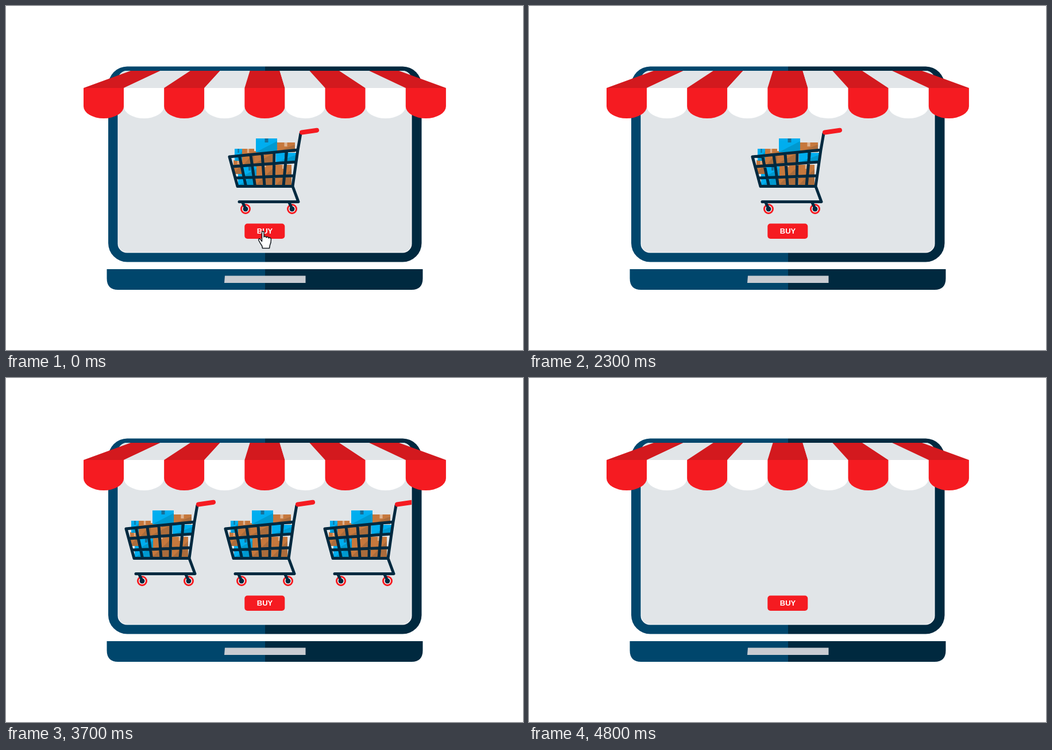
These frames come from a looping animation (900x600 px, 7.8 s). An HTML page:

```html
<!DOCTYPE html>
<html lang="en">
<head>
<meta charset="utf-8">
<title>Online shop</title>
<style>
  html, body { margin: 0; width: 100%; height: 100%; overflow: hidden; background: #fff; }
  svg { display: block; width: 100%; height: 100%; }
  text { font: bold 13px "Liberation Sans", Arial, sans-serif; fill: #fff; text-anchor: middle; }
  .frame { fill: none; stroke: #00293f; stroke-width: 5; stroke-linecap: round; stroke-linejoin: round; }
</style>
</head>
<body>
<svg viewBox="0 0 900 600">
  <defs>
    <linearGradient id="split" gradientUnits="userSpaceOnUse" x1="0" x2="900" y1="0" y2="0">
      <stop offset="0.5006" stop-color="#00466c"/>
      <stop offset="0.5006" stop-color="#00293f"/>
    </linearGradient>
    <clipPath id="screen"><rect x="194.5" y="196" width="511.5" height="234"/></clipPath>
  </defs>

  <g id="laptop">
    <rect x="178" y="105.5" width="545.5" height="341" rx="33" fill="url(#split)"/>
    <rect x="194.5" y="113" width="512" height="317.5" rx="16" fill="#fff"/>
    <rect x="195.5" y="113" width="510" height="316.5" rx="15" fill="#e1e5e8"/>
    <path d="M175.500 459H725.500V475Q725.500 495 706 495H195Q175.500 495 175.500 475Z" fill="url(#split)"/>
    <path d="M381 470.500H521.500V483H380Z" fill="#c8ccd2"/>
  </g>

  <g id="awning"></g>

  <g clip-path="url(#screen)">
    <g id="carts">
      <g id="cart">
        <g id="boxes"></g>
        <path class="frame" d="M513 222L508 251L499 314.500H403L389 263L508 251M394 280L504 272M399 300L501 296
          M406.500 262L417.500 314M426 260L433.500 314M446 258L450 314M467 256L466 314M488.500 254L483 314
          M499 314.500L509 341.500H406"/>
        <path d="M515 220.500L541 216.700" stroke="#f51b21" stroke-width="8" stroke-linecap="round"/>
        <g id="wheels"></g>
      </g>
      <g id="followers" display="none">
        <use href="#cart" x="173"/>
        <use href="#cart" x="346"/>
      </g>
    </g>
  </g>

  <rect x="415.300" y="379.500" width="70" height="26.500" rx="5" fill="#f51b21"/>
  <text x="450.500" y="396.600">BUY</text>

  <path id="hand" fill="#fff" stroke="#151b20" stroke-width="1.500" stroke-linejoin="round"
    d="M445.500 411V395Q445.500 393 447.200 393T449 395V403Q449.500 401.500 451.200 401.800T453 404
       Q453.500 402.500 455.300 402.800T457.200 405Q458 403.600 459.700 404.200T461.500 407
       Q461.500 413 459.500 417L458.500 422.500H446.500L445.700 418.500Q442 413 439.800 408.500
       Q439.300 406 441.500 405.800Q443.500 407 445.500 411"/>
</svg>

<script>
const LOOP = 7800;
const byId = id => document.getElementById(id);

function add(parent, tag, attributes) {
  const node = document.createElementNS("http://www.w3.org/2000/svg", tag);
  for (const [key, value] of Object.entries(attributes)) node.setAttribute(key, value);
  return parent.appendChild(node);
}

function buildAwning() {
  for (let i = 0; i < 9; i++) {
    const red = i % 2 === 0;
    const top = 217 + 51.9 * i, left = 135 + 70.1 * i, right = left + 70.1;
    add(byId("awning"), "path", {
      d: `M${top} 113H${top + 51.9}L${right} 143H${left}Z`, fill: red ? "#d3191e" : "#e1e5e8"
    });
    add(byId("awning"), "path", {
      d: `M${left} 143H${right}V175A35.05 21 0 0 1 ${left} 175Z`, fill: red ? "#f51b21" : "#fff"
    });
  }
}

const BLUE = { face: "#00aeef", shade: "#0099cf", tape: "#176f98" };
const BROWN = { face: "#c6783d", shade: "#aa6c3c", tape: "#deb28f" };

// Each box: appearance time, left, top, right, bottom, colours.
const boxes = [
  [700, 404, 292, 433, 313, BLUE],
  [700, 434, 274, 466, 313, BROWN],
  [700, 469, 277, 497, 313, BROWN],
  [900, 412, 280, 436, 297, BLUE],
  [1100, 396, 269, 412, 293, BROWN],
  [1300, 470, 256, 505, 273, BLUE],
  [1500, 432, 253, 465, 275, BROWN],
  [1700, 411, 249, 432, 280, BROWN],
  [1900, 398, 249, 411, 270, BLUE],
  [2100, 471, 238, 503, 255, BROWN],
  [2300, 435, 231, 472, 255, BLUE]
].map(([start, left, top, right, bottom, color]) => {
  const node = add(byId("boxes"), "g", {});
  const width = right - left, height = bottom - top;
  const tape = width * 0.16, middle = left + width / 2;
  add(node, "rect", { x: left, y: top, width, height, fill: color.face });
  add(node, "path", { d: `M${right} ${top + height * 0.2}V${bottom}H${left}Z`, fill: color.shade });
  add(node, "rect", { x: middle - tape / 2, y: top, width: tape, height: 7, fill: color.tape });
  return { node, start };
});

function buildWheels() {
  for (const x of [417, 498]) {
    add(byId("wheels"), "circle", { cx: x, cy: 354, r: 7.5, fill: "#fff", stroke: "#f51b21", "stroke-width": 3 });
    add(byId("wheels"), "circle", { cx: x, cy: 354, r: 4.5, fill: "#00293f" });
    add(byId("wheels"), "path", { d: `M${x - 5} 343L${x} 353`, class: "frame" });
  }
}

function show(node, visible) {
  node.setAttribute("display", visible ? "inline" : "none");
}

function move(node, x) {
  node.setAttribute("transform", `translate(${x} 0)`);
}

function draw(now) {
  const time = Math.floor((now % LOOP) / 100) * 100;
  for (const { node, start } of boxes) show(node, time < 100 || time >= start);

  const handEntering = time >= 2500 && time < 2900;
  show(byId("hand"), time < 100 || (time >= 2500 && time < 3300));
  move(byId("hand"), handEntering ? (time - 2900) / 100 * 15.5 : 0);

  show(byId("carts"), time < 4800);
  show(byId("followers"), time >= 3300);
  move(byId("carts"), -45 * Math.max(0, (time - 3300) / 100));
  requestAnimationFrame(draw);
}

buildAwning();
buildWheels();
requestAnimationFrame(draw);
</script>
</body>
</html>
```
